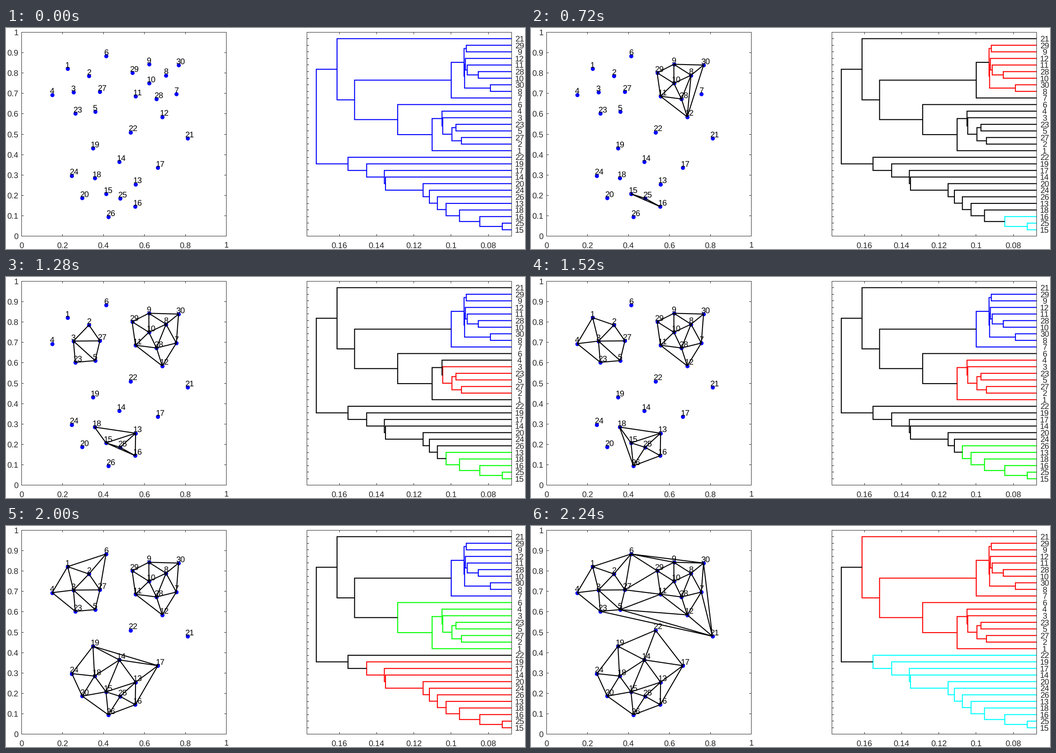
These frames come from a looping animation (1146 by 489 pixels, 2320 ms). A matplotlib script:

```python
import colorsys
from itertools import combinations
from math import dist, floor, nan

import matplotlib.pyplot as plt
from matplotlib.animation import FuncAnimation
from matplotlib.tri import Triangulation

W, H, DPI = 1146, 489, 64
PX = 72 / DPI                       # points per pixel
INK = "#262626"
TOP, BOTTOM = 9.5, 460.5
LEFT_BOX = (34.5, 486.5)
RIGHT_BOX = (664.5, 1116.5)
UNIT = 451.5                        # pixels per unit in the scatter panel
FONT = 18
MID = 6.4                           # half a digit's height
LINE = 2.15

# Point centres in pixels, labelled 1..30; the whole tree follows from them
POINTS = dict(enumerate([
    (136.1, 89.9), (183.1, 106.2), (149, 141.8), (102, 147.5), (196.8, 185),
    (220.8, 62), (376.1, 146.2), (353.4, 104.5), (315.5, 80.3), (315.5, 122.3),
    (285.9, 151), (345, 196.7), (286.2, 345.6), (250.2, 296.3), (220.8, 367),
    (285.4, 395.4), (335.4, 309), (195.5, 332.1), (192, 266), (168.4, 376.4),
    (400.5, 243.8), (275, 230.7), (153, 188.8), (145.4, 326.6), (252, 376.9),
    (226, 417.8), (207.3, 141.3), (332.3, 157), (278.5, 99), (381, 82),
], 1))


def tree_x(d):
    """Position on the reversed distance axis."""
    return 736 + (0.16 - d) * 4112.5


def row_y(i):
    return 235 + 14.58 * (i - 14.5)


def single_linkage():
    """Join the nearest clusters until one is left: (low, high, distance)."""
    def gap(pair):
        return dist(POINTS[pair[0]], POINTS[pair[1]])

    home = {n: (n,) for n in POINTS}
    pairs = sorted(combinations(POINTS, 2), key=gap)
    closest = pairs[0]

    def rank(side):
        return min(0 if n in closest else n for n in side)

    joins = []
    for a, b in pairs:
        if home[a] != home[b]:
            low, high = sorted((home[a], home[b]), key=rank)
            joins.append((low, high, gap((a, b)) / UNIT))
            for n in low + high:
                home[n] = low + high
    return joins


def brackets(joins, leaves):
    """The three-sided bar of every join."""
    node = {(n,): (RIGHT_BOX[1], row_y(i)) for i, n in enumerate(leaves)}
    bars = []
    for low, high, d in joins:
        x = tree_x(d)
        (x0, y0), (x1, y1) = node[low], node[high]
        node[low + high] = (x, (y0 + y1) / 2)
        bars.append(([x0, x, x, x1], [y0, y0, y1, y1]))
    return bars


def clusters_after(k):
    """Clusters left after k joins, latest first."""
    found = []
    for c in reversed(clusters[:k]):
        if not any(set(c) <= set(f) for f in found):
            found.append(c)
    return found


def tree_colors(k, found):
    """One hue per cluster; black above the cut."""
    if k < 2:
        return ["blue"] * len(clusters)
    colors = []
    for c in clusters:
        hue = [i for i, f in enumerate(found) if set(c) <= set(f)]
        colors.append(colorsys.hsv_to_rgb(hue[0] / len(found), 1, 1)
                      if hue else "black")
    return colors


def mesh(found):
    """Delaunay edges of every cluster as one broken line."""
    xs, ys = [], []
    for members in found:
        px, py = zip(*(POINTS[n] for n in members))
        edges = [(0, 1)] if len(px) == 2 else Triangulation(px, py).edges
        for i, j in edges:
            xs += [px[i], px[j], nan]
            ys += [py[i], py[j], nan]
    return xs, ys


plt.rcParams.update({"font.family": "Liberation Sans",
                     "text.hinting": "none", "text.kerning_factor": 6})
fig = plt.figure(figsize=(W / DPI, H / DPI), dpi=DPI, facecolor="white")
ax = fig.add_axes([0, 0, 1, 1])
ax.set_xlim(0, W)
ax.set_ylim(H, 0)
ax.axis("off")


def stroke(xs, ys, color, width, z):
    return ax.plot(xs, ys, color=color, lw=width * PX, zorder=z, snap=False,
                   solid_capstyle="butt", solid_joinstyle="miter")[0]


def label(x, y, text, align, color=INK):
    ax.text(x, y, text, ha=align, va="baseline", color=color,
            fontsize=FONT * PX, zorder=6)


def frame_box(box, xticks, yticks):
    x0, x1 = box
    stroke([x0, x1, x1, x0, x0], [TOP, TOP, BOTTOM, BOTTOM, TOP], INK, 1, 5)
    for x in (floor(t) + 0.5 for t in xticks):
        stroke([x, x], [TOP, TOP + 4.5], INK, 1, 5)
        stroke([x, x], [BOTTOM - 4.5, BOTTOM], INK, 1, 5)
    for y in (floor(t) + 0.5 for t in yticks):
        stroke([x0, x0 + 4.5], [y, y], INK, 1, 5)
        stroke([x1 - 4.5, x1], [y, y], INK, 1, 1)


# Scatter panel
x_at = [LEFT_BOX[0] + 452 * i / 5 for i in range(6)]
y_at = [BOTTOM - 451 * i / 10 for i in range(11)]
frame_box(LEFT_BOX, x_at, y_at)
for i, x in enumerate(x_at):
    label(x, 486.5, f"{i / 5:g}", "center")
for i, y in enumerate(y_at):
    label(27.8, y + MID, f"{i / 10:g}", "right")
ax.plot(*zip(*POINTS.values()), "o", color="blue", ms=9 * PX, mew=0,
        zorder=2, snap=False)
for n, (x, y) in POINTS.items():
    label(x - 5.2, y - 2.3, str(n), "left", "black")
links = stroke([], [], "black", LINE, 3)

# Tree panel
joins = single_linkage()
clusters = [low + high for low, high, _ in joins]
leaves = clusters[-1][::-1]
ticks = [0.16 - 0.02 * i for i in range(5)]
frame_box(RIGHT_BOX, map(tree_x, ticks), map(row_y, range(len(leaves))))
for t in ticks:
    label(tree_x(t), 486.5, f"{t:.2g}", "center")
for i, n in enumerate(leaves):
    label(1134, row_y(i) + MID, str(n), "center")
bars = [stroke(xs, ys, "blue", LINE, 3) for xs, ys in brackets(joins, leaves)]


def update(k):
    found = clusters_after(k)
    links.set_data(*mesh(found))
    for bar, color in zip(bars, tree_colors(k, found)):
        bar.set_color(color)
    return [links, *bars]


anim = FuncAnimation(fig, update, frames=len(clusters), interval=80,
                     repeat=True, repeat_delay=0, blit=False)
plt.show()
```
